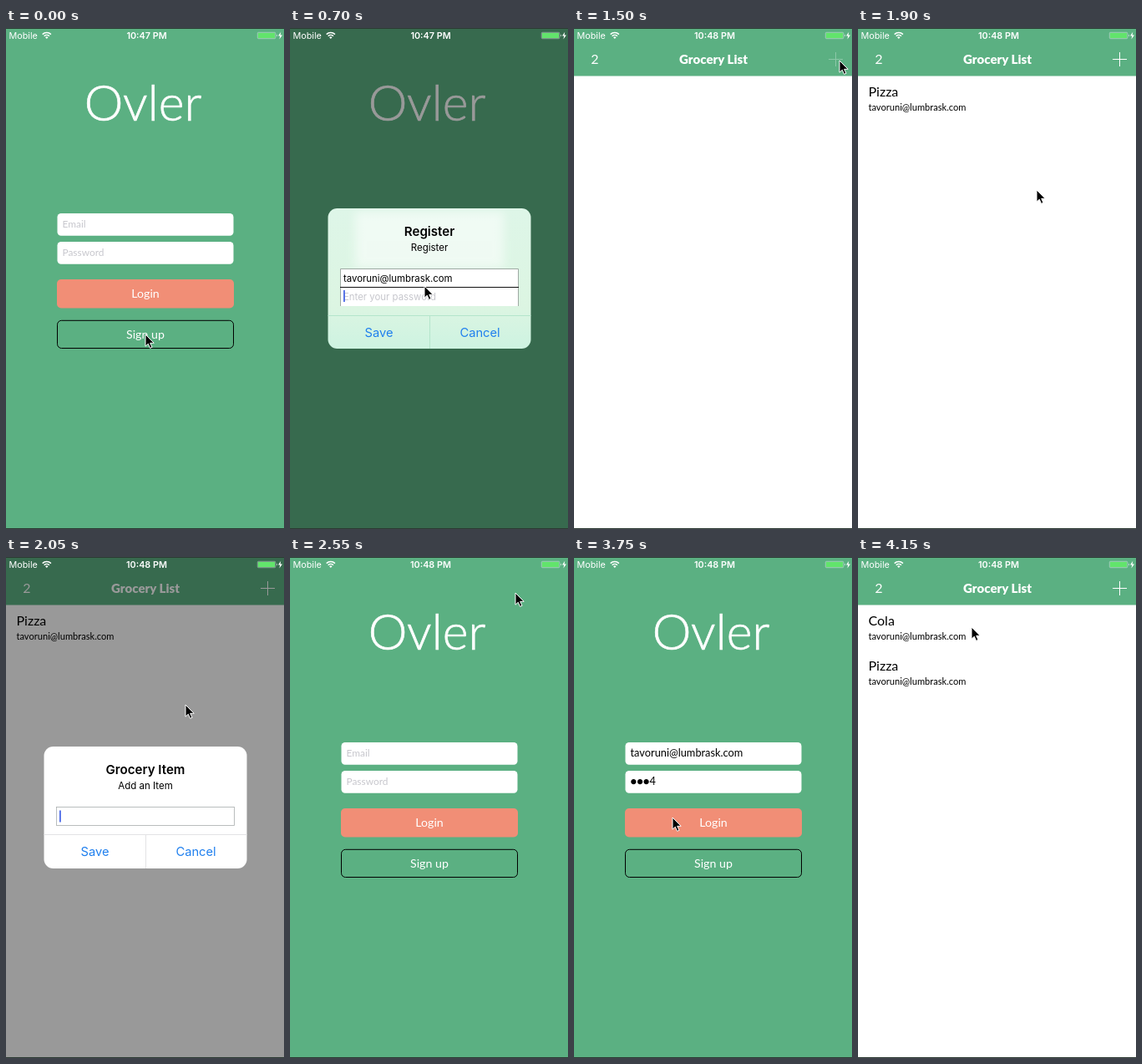
An HTML page that plays this animation: 333x600 px, repeating every 4.2 s.

```html
<!DOCTYPE html>
<html lang="en">
<head>
<meta charset="utf-8">
<title>Shopping list sign-up</title>
<style>
  html, body { margin: 0; width: 100%; height: 100%; overflow: hidden; background: #5bb082; }
  svg { display: block; width: 333px; height: 600px; }
  text { white-space: pre; }
  .lato { font-family: Lato, "Open Sans", sans-serif; }
  .inter { font-family: Inter, Roboto, sans-serif; }
  .mid { text-anchor: middle; }
  .white { fill: #fff; }
  .hint { fill: #c7c7cd; }
  .head { font-size: 15.1px; font-weight: 600; }
  .note { font-size: 11.5px; }
  .entry { font-size: 11.4px; }
  .action { font-size: 14.7px; fill: #1f7fee; }
  .form { font-size: 12.8px; }
  .form.hint { font-size: 11.9px; }
  .button { font-size: 14.2px; }
  .item { font-size: 16px; }
  .owner { font-size: 11.1px; }
</style>
</head>
<body>
<svg viewBox="0 0 333 600">
  <defs>
    <filter id="soft" x="-30%" y="-50%" width="160%" height="200%"><feGaussianBlur stdDeviation="6"/></filter>
    <clipPath id="card"><rect x="45.5" y="216" width="243" height="168" rx="11"/></clipPath>
    <linearGradient id="tint" x2="0" y2="1">
      <stop offset="0" stop-color="#def6e8"/>
      <stop offset=".7" stop-color="#dcf5e2"/>
      <stop offset="1" stop-color="#cdf3e1"/>
    </linearGradient>
  </defs>

  <g id="login" class="lato">
    <rect width="333" height="600" fill="#5bb082"/>
    <text class="mid white" x="164" y="110.7" font-size="59" font-weight="300" stroke="#fff" stroke-width=".7">Ovler</text>
    <g fill="#fff">
      <rect x="61.5" y="222" width="211" height="26.8" rx="4.5"/>
      <rect x="61.5" y="256" width="211" height="26.8" rx="4.5"/>
    </g>
    <text id="mail" class="form" x="67.5" y="239.2"></text>
    <text id="pass" class="form" x="67.5" y="273.2"></text>
    <rect x="61" y="301" width="212" height="34.5" rx="5" fill="#f18e76"/>
    <text id="loginLabel" class="mid white button" x="167" y="323">Login</text>
    <rect x="61.5" y="350.3" width="211" height="33.2" rx="5" fill="none" stroke="#000"/>
    <text id="signLabel" class="mid white button" x="167" y="371.5">Sign up</text>
  </g>

  <g id="list" class="lato">
    <rect width="333" height="600" fill="#fff"/>
    <rect width="333" height="57.5" fill="#5bb082"/>
    <text class="mid white" x="25" y="43.3" font-size="16">2</text>
    <text class="mid white" x="167" y="43" font-size="15.1" font-weight="900">Grocery List</text>
    <path id="plus" d="M305 37.5h17M313.5 29v17" stroke="#fff"/>
    <g id="row0"><text class="item" x="12.5" y="82"></text><text class="owner" x="12.5" y="99"></text></g>
    <g id="row1"><text class="item" x="12.5" y="136"></text><text class="owner" x="12.5" y="153"></text></g>
  </g>

  <rect id="shade" width="333" height="600" opacity=".4"/>

  <g id="register" class="inter">
    <g clip-path="url(#card)">
      <rect x="45" y="216" width="244" height="168" fill="url(#tint)"/>
      <rect x="78" y="220" width="178" height="68" fill="#fff" opacity=".55" filter="url(#soft)"/>
    </g>
    <text class="mid head" x="167" y="248.5">Register</text>
    <text class="mid note" x="167" y="266.5">Register</text>
    <rect x="60" y="288" width="214" height="45" fill="#fff"/>
    <path d="M60.5 333V288.5H273.5V333" fill="none" stroke="#74867c" stroke-width=".7"/>
    <path d="M60 310.5h214" stroke="#111"/>
    <text id="newMail" class="entry" x="64" y="303.5"></text>
    <text id="newPass" class="entry" x="64" y="326"></text>
    <path d="M45.5 344.5h243M167.5 345v39" stroke="#b4e5cb"/>
    <text class="mid action" x="106.5" y="369.5">Save</text>
    <text class="mid action" x="227.5" y="369.5">Cancel</text>
  </g>

  <g id="add" class="inter">
    <rect x="45.5" y="227" width="243" height="146" rx="11" fill="#fff"/>
    <text class="mid head" x="167" y="259.8">Grocery Item</text>
    <text class="mid note" x="167" y="278">Add an Item</text>
    <rect x="60.5" y="299.5" width="213" height="22" fill="#fff" stroke="#a9adad" stroke-width=".8"/>
    <text id="newItem" class="entry" x="64" y="314.5"></text>
    <path d="M45.5 332.5h243M167.5 333v40" stroke="#e3e3e5"/>
    <text class="mid action" x="106.5" y="358.3">Save</text>
    <text class="mid action" x="227.5" y="358.3">Cancel</text>
  </g>

  <rect id="caret" width="1.8" height="14" fill="#4a69e8"/>

  <g class="inter white">
    <text x="3.5" y="13" font-size="10.8">Mobile</text>
    <path d="M43.7 7.6a7.2 7.2 0 0 1 10.2 0M45.7 9.7a4.4 4.4 0 0 1 6.2 0" fill="none" stroke="#fff" stroke-width="1.5"/>
    <path d="M48.8 13l-1.7-1.8a2.4 2.4 0 0 1 3.4 0z"/>
    <text id="clock" class="mid" x="168.5" y="13" font-size="10.8" font-weight="600"></text>
    <rect x="301.3" y="5.3" width="21.5" height="7.4" rx="1.2" fill="none" stroke="#fff" stroke-width=".7" opacity=".6"/>
    <rect x="302" y="6" width="20" height="6" fill="#62e46c"/>
    <path d="M324 7.5q1.6 1.5 0 3z"/>
    <path d="M329.2 4.8l-3.2 4.8h2.3l-.9 3.8 3.6-5h-2.4z"/>
  </g>

  <path d="M0 .5h333M0 599.5h333" stroke="#2c3a33"/>
  <path id="cursor" d="M0 0V14.2L3.3 11.2 5.6 16.4 8 15.3 5.7 10.3H10.2Z" stroke="#fff"/>
</svg>

<script>
const LOOP = 4200, STEP = 50;
const EMAIL = "tavoruni@lumbrask.com", SECRET = "123456";
const $ = id => document.getElementById(id);

// Each entry holds from its time until the next one.
const scenes = [
  [0, "login"], [100, "login", "register"], [1050, "login"], [1150, "list"],
  [1550, "list", "add"], [1850, "list"], [2000, "list", "add"], [2350, "list"],
  [2500, "login"], [3950, "list"]
];
const rows = [[0], [1850, "Pizza"], [2350, "Cola", "Pizza"]];

// Pointer stops: time, x, y
const path = [
  [0, 167, 367], [100, 167, 367], [200, 161, 309], [900, 161, 309],
  [1000, 106, 362], [1150, 106, 362], [1450, 318, 39], [1550, 318, 39],
  [1750, 112, 350], [1850, 112, 350], [1950, 316, 38], [2000, 316, 38],
  [2050, 215, 177], [2250, 106, 353], [2350, 106, 353], [2500, 270, 43],
  [2550, 270, 43], [2700, 130, 236], [2800, 130, 236], [3050, 31, 479],
  [3300, 150, 12], [3400, 256, 9], [3500, 34, 250], [3600, 100, 268],
  [3750, 118, 312], [3850, 118, 318], [3950, 118, 318], [4150, 136, 84], [LOOP, 136, 84]
];

const pick = (table, t) => table.filter(e => e[0] <= t).pop();
const show = (id, on) => $(id).setAttribute("display", on ? "inline" : "none");
const fade = (id, on) => $(id).setAttribute("opacity", on ? .3 : 1);

function typed(word, t, from, to) {
  const part = Math.min(1, Math.max(0, (t - from) / (to - from)));
  return word.slice(0, Math.round(part * word.length));
}

// Dots, with the newest character still readable while typing.
function masked(word, busy) {
  const n = word.length;
  return busy && n ? "●".repeat(n - 1) + word[n - 1] : "●".repeat(n);
}

function fill(id, value, hint = "") {
  const el = $(id);
  el.textContent = value || hint;
  el.classList.toggle("hint", !value);
}

function caretAfter(id, value, y) {
  const width = value ? $(id).getComputedTextLength() + 1 : 0;
  $("caret").setAttribute("x", 64 + width);
  $("caret").setAttribute("y", y);
}

function moveCursor(t) {
  const i = path.findIndex(p => p[0] > t);
  const [t0, x0, y0] = path[i - 1], [t1, x1, y1] = path[i];
  const k = (t - t0) / (t1 - t0);
  $("cursor").setAttribute("transform", `translate(${x0 + (x1 - x0) * k} ${y0 + (y1 - y0) * k})`);
}

function draw(t) {
  const [, page, alert] = pick(scenes, t);
  for (const id of ["login", "list"]) show(id, id === page);
  for (const id of ["register", "add"]) show(id, id === alert);
  show("shade", alert);
  show("caret", alert);
  $("clock").textContent = t < 1150 ? "10:47 PM" : "10:48 PM";

  fade("signLabel", t === 50);
  fade("loginLabel", t === 3900);
  fade("plus", t === 1500 || t === 1950);

  fill("mail", typed(EMAIL, t, 2800, 3300), "Email");
  fill("pass", masked(typed(SECRET, t, 3550, 3850), t < 3900), "Password");

  const [, ...items] = pick(rows, t);
  [0, 1].forEach(i => {
    const [name, owner] = $("row" + i).children;
    name.textContent = items[i] || "";
    owner.textContent = items[i] ? EMAIL : "";
  });

  if (alert === "register") {
    const mail = typed(EMAIL, t, 150, 600);
    const pass = masked(typed(SECRET, t, 700, 950), t < 1000);
    fill("newMail", mail, "Enter your email");
    fill("newPass", pass, "Enter your password");
    if (t < 650) caretAfter("newMail", mail, 292);
    else caretAfter("newPass", pass, 314);
  } else if (alert === "add") {
    const item = t < 2000 ? typed("Pizza", t, 1550, 1750) : typed("Cola", t, 2050, 2250);
    fill("newItem", item);
    caretAfter("newItem", item, 303.5);
  }
  moveCursor(t);
}

let last = -1;
function tick() {
  const t = Math.floor(performance.now() % LOOP / STEP) * STEP;
  if (t !== last) draw(last = t);
  requestAnimationFrame(tick);
}
tick();
</script>
</body>
</html>
```
